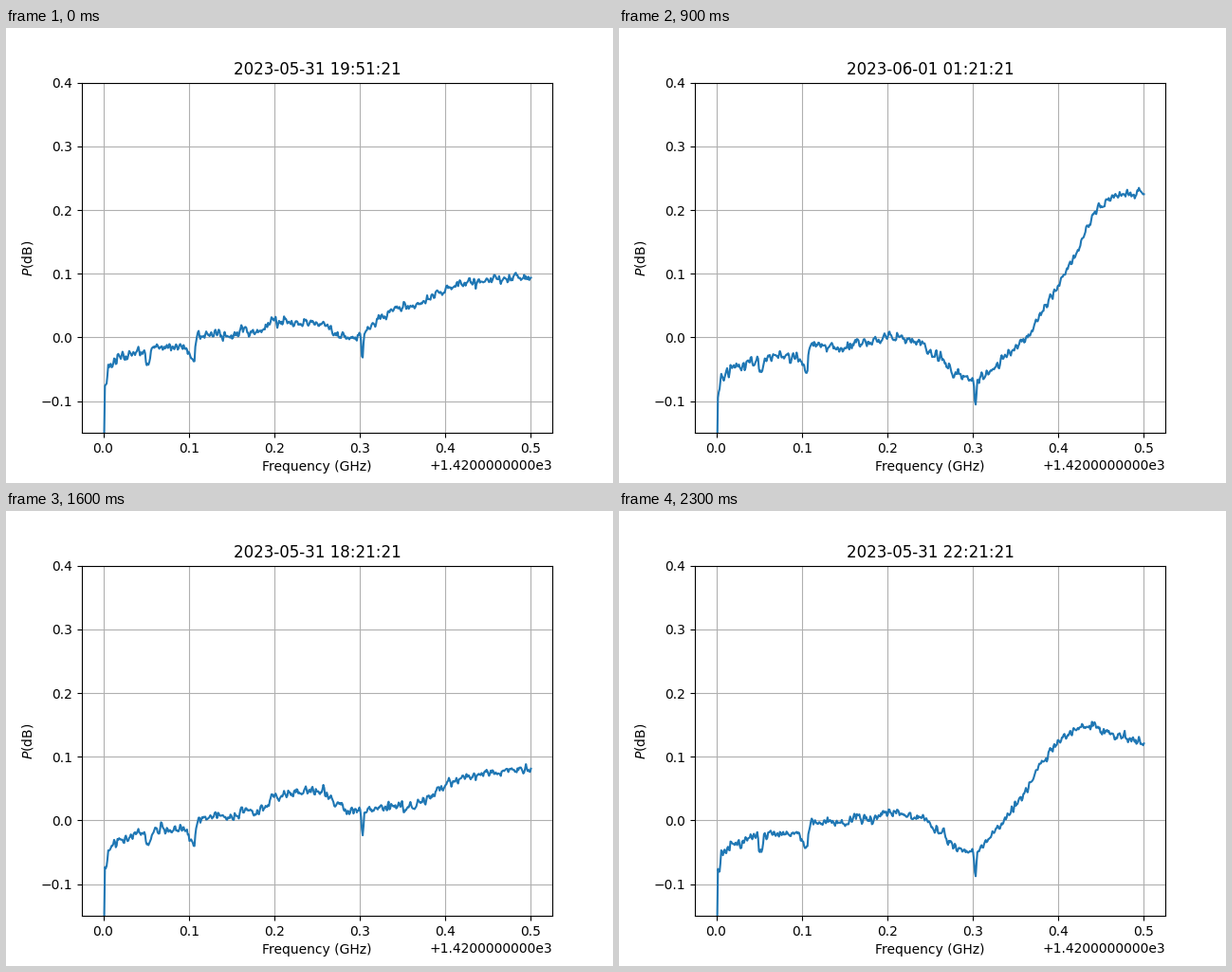
These frames come from a looping animation (640x480 px, 2400 ms). A matplotlib script:

```python
import numpy as np
import matplotlib.pyplot as plt
from matplotlib.animation import FuncAnimation
from matplotlib.ticker import FixedFormatter

# Half-hour offsets from 18:51:21, played unsorted; the first one is held.
ORDER = [2, 2, 6, 15, 10, -2, 12, 1, 17, 13, 5, -4,
         0, 9, 3, 16, -1, 11, 4, 14, -3, 8, 18, 7]

freq = np.linspace(0, 0.5, 512)

# Power levels in mdB at the knots, for some half-hour offsets
KNOTS = [.115, .15, .18, .2, .22, .24, .26, .28, .3, .32,
         .34, .36, .38, .4, .42, .44, .46, .48, .5]
LEVELS = {
    0: [3, 7, 17, 33, 40, 49, 43, 18, 14, 18, 27, 22, 34, 55, 66, 70, 73, 82, 77],
    2: [3, 4, 13, 24, 23, 25, 18, -2, 4, 27, 48, 46, 60, 74, 85, 87, 90, 97, 92],
    3: [2, 3, 11, 20, 15, 18, 4, -13, -7, 20, 49, 55, 71, 82, 89, 92, 91, 95, 90],
    4: [0, 3, 6, 15, 13, 9, -6, -29, -23, 5, 37, 54, 74, 88, 91, 93, 91, 93, 86],
    7: [-3, -3, 4, 11, 9, 4, -15, -44, -50, -30, 7, 43, 90, 121, 144, 149, 133, 130, 118],
    10: [-10, -12, -4, -1, -1, -7, -26, -58, -64, -55, -20, 5, 56, 122, 183, 217, 213, 203, 187],
    13: [-13, -15, -6, -1, -3, -10, -30, -60, -65, -55, -26, -5, 35, 80, 128, 192, 219, 227, 226],
}

# Band edge and its notches, relative to the first knot
EDGE_X = [0, .001, .002, .004, .006, .008, .012, .02, .03, .04, .048,
          .0505, .056, .06, .098, .103, .1065, .108, .112]
EDGE_Y = [-500, -160, -70, -83, -48, -53, -40, -36, -32, -26, -24,
          -45, -26, -17, -17, -36, -42, -13, 0]


def bump(center, height, width):
    return height * np.exp(-((freq - center) / width) ** 2)


def noise(seed, size):
    raw = np.random.default_rng(seed).normal(0, size, freq.size + 2)
    return np.convolve(raw, [.3, .9, .3], "valid")


def smooth(y, width=17):
    kernel = np.hanning(width + 2)
    padded = np.pad(y, (width + 1) // 2, mode="edge")
    return np.convolve(padded, kernel / kernel.sum(), "valid")


receiver = (np.interp(freq, EDGE_X, EDGE_Y) + noise(1420, 2.8)
            + bump(.129, 5, .004) + bump(.165, 5, .004)
            + bump(.202, 5, .003) + bump(.303, -40, .0016))


def spectrum(step):
    times = list(LEVELS)
    row = [np.interp(step, times, column) for column in zip(*LEVELS.values())]
    sky = smooth(np.interp(freq, KNOTS, row))
    return (receiver + sky + noise(step + 100, 2.9)) / 1000


def stamp(step):
    days, minutes = divmod(18 * 60 + 51 + 30 * step, 24 * 60)
    date = "2023-06-01" if days else "2023-05-31"
    return f"{date} {minutes // 60:02d}:{minutes % 60:02d}:21"


fig, ax = plt.subplots(figsize=(6.4, 4.8), dpi=100)
line, = ax.plot(freq, spectrum(ORDER[0]), color="C0")
title = ax.set_title(stamp(ORDER[0]))
ticks = np.arange(6) / 10
labels = FixedFormatter([f"{t:.1f}" for t in ticks])
labels.set_offset_string("+1.4200000000e3")
ax.set_xticks(ticks)
ax.xaxis.set_major_formatter(labels)
ax.set(xlim=(-.025, .525), ylim=(-.15, .4),
       xlabel="Frequency (GHz)", ylabel="$P$(dB)")
ax.grid(True)


def update(i):
    line.set_ydata(spectrum(ORDER[i]))
    title.set_text(stamp(ORDER[i]))
    return line, title


anim = FuncAnimation(fig, update, frames=len(ORDER), interval=100,
                     repeat=True, repeat_delay=0, blit=False)
plt.show()
```
